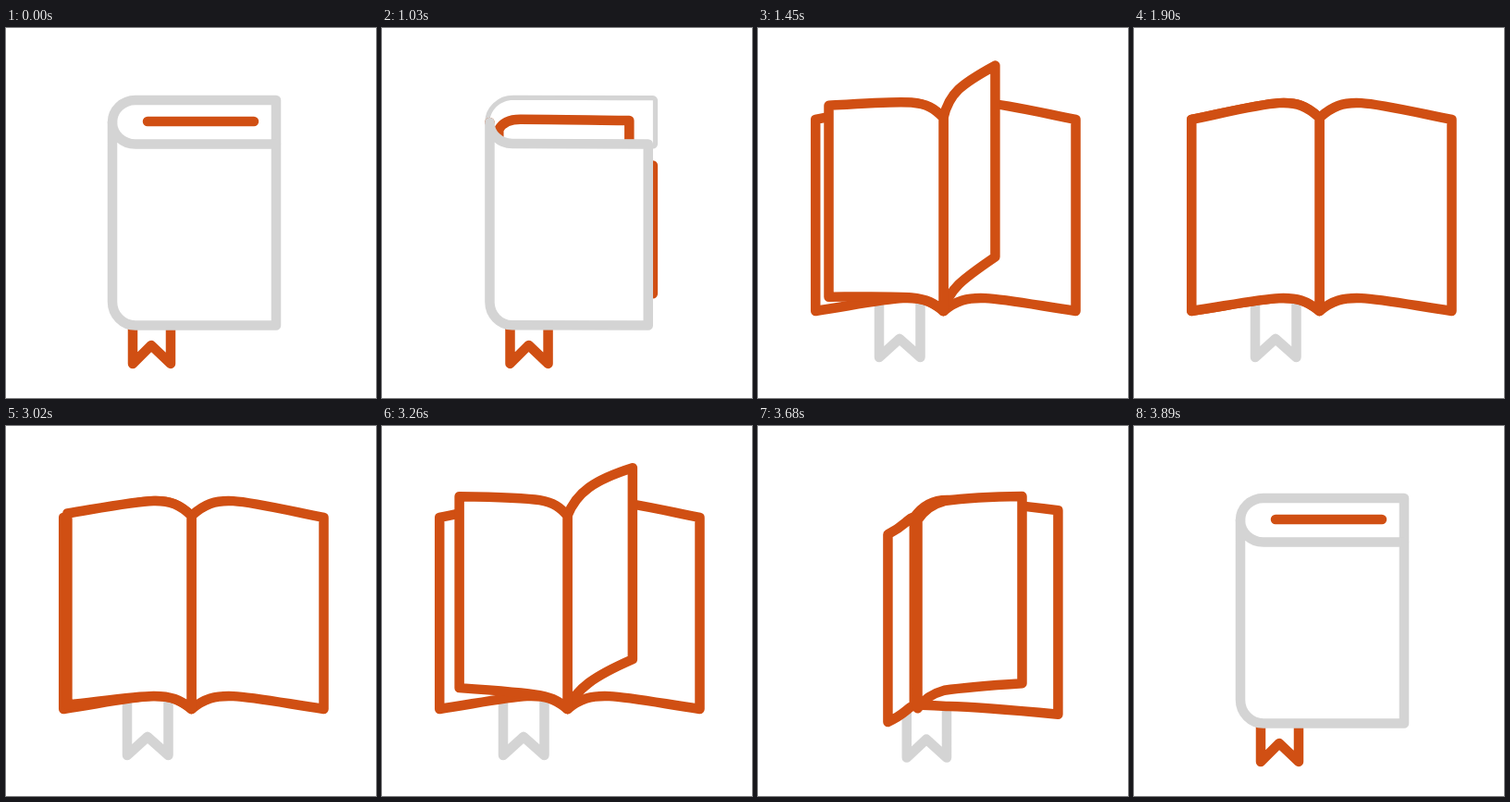
An HTML page for the animation above (3920 ms loop, 400 by 400 pixels).

```html
<!DOCTYPE html>
<html lang="en">
<head>
<meta charset="utf-8">
<title>Book</title>
<style>
  html, body { margin: 0; width: 100%; height: 100%; overflow: hidden; background: #fff; }
  svg { display: block; width: 100%; height: 100%; }
</style>
</head>
<body>
<svg id="stage" viewBox="0 0 400 400" fill="#fff" stroke-width="10.5"
     stroke-linecap="round" stroke-linejoin="round"></svg>
<script>
const LOOP = 3920, STEP = 30, STEPS = 30;
const OPEN_AT = 1030, CLOSE_AT = 3020;
const COVER_TIME = 360, PAGE_TIME = 415, PAGE_STARTS = [100, 295, 490];
const GRAY = '#d4d4d4', ORANGE = '#d04f13';

const stage = document.getElementById('stage');
const clamp = v => Math.max(0, Math.min(1, v));
const mix = (a, b, t) =>
  Array.isArray(a) ? a.map((v, i) => mix(v, b[i], t)) : a + (b - a) * t;

function blend(keys, at) {
  let i = 1;
  while (i < keys.length - 1 && at > keys[i][0]) i++;
  const [from, a] = keys[i - 1], [to, b] = keys[i];
  return mix(a, b, clamp((at - from) / (to - from)));
}

// Every page edge is two joined cubics (seven points) relative to the spine.
function split([x1, y1, x2, y2, x3, y3]) {
  const p = [0, 0], q = [x1, y1], r = [x2, y2], s = [x3, y3];
  const a = mix(p, q, .5), m = mix(q, r, .5), d = mix(r, s, .5);
  const b = mix(a, m, .5), c = mix(m, d, .5);
  return [p, a, b, mix(b, c, .5), c, d, s];
}
const lower = ([x1, y1, x2, y2, x3, y3]) => split([x1, y1 + 3, x2, y2 + 3, x3, y3 - 2]);
const closedEdge = y =>
  [[0, 0], [0, y * .55], [11, y], [25, y], [75, y], [126, y], [177, y]];

const FLAT = [28, -25, 45, -18, 143, 2];
const FLAT_LEFT = FLAT.map((v, i) => i % 2 ? v : -v * .967);
const UPRIGHT = split([2, 8, 5, 16, 10, 24]);
const TURN = [
  [-1, FLAT],
  [-.55, [12, -25, 35, -40, 79, -49]],
  [-.31, [3, -27, 12, -35, 45, -60]],
  [.2, [-4, -25, -10, -38, -29, -62]],
  [.79, [-14, -17, -22, -20, -113, -25]],
  [1, FLAT_LEFT]
];
const INNER_EDGE = [[10, 8], [14, 0], [22, -3], [33, -3], [75, -3], [120, -2], [151, -2]];

const moveTo = (points, [x, y]) => points.map(p => [p[0] + x, p[1] + y]);
const curve = p => `${p[0]}C${p.slice(1).join(' ')}`;
const sheet = (top, bottom) => `M${curve(top)}L${curve([...bottom].reverse())}`;
const path = (d, color, extra = '') => `<path d="${d}" stroke="${color}" ${extra}/>`;

function draw(step) {
  const time = step * STEP;
  const m = (1 - Math.cos(Math.PI * clamp(time / COVER_TIME))) / 2;
  const flipped = m > .5;
  const head = mix([115, 102], [200.5, 97], m);
  const foot = mix([115, 296], [200.5, 306], m);

  const sway = 30 * Math.sin(Math.PI * m);
  const ribbon = mix(
    [[137, 310], [137, 363], [157, 343], [178, 363], [178, 310]],
    [[131, 290], [131, 356], [153, 336], [175.5, 356], [175.5, 290]], m);
  let out = path('M' + moveTo(ribbon, [sway, 0]).join('L'), flipped ? GRAY : ORANGE);

  // Back cover: gray rim, then the orange outline grows from its outer edge.
  const backTop = moveTo(mix(closedEdge(-24), split(FLAT), m), head);
  const backBottom = moveTo(mix(closedEdge(25.5), lower(FLAT), m), foot);
  const grown = clamp((step - 1) / 4);
  if (grown < 1) out += path(`M${curve(backTop)}v47`, GRAY);
  if (step > 0) {
    const from = mix(.417, 0, grown), to = mix(.64, 1, grown);
    const dash = grown < 1 ? `pathLength="1" stroke-dasharray="0 ${from} ${to - from} 2"` : '';
    out += path(sheet(backTop, backBottom), ORANGE, dash);
  }

  const frontTop = blend([[0, closedEdge(23.5)], [.5, UPRIGHT], [1, split(FLAT_LEFT)]], m);
  const frontBottom = blend([[0, closedEdge(25.5)], [.5, UPRIGHT], [1, lower(FLAT_LEFT)]], m);
  const front = path(sheet(moveTo(frontTop, head), moveTo(frontBottom, foot)) + 'Z',
    flipped ? ORANGE : GRAY);

  const right = [], left = [];
  PAGE_STARTS.forEach((start, i) => {
    const progress = (time - start) / PAGE_TIME;
    if (progress >= 1 || (progress <= 0 && (i || !step))) return;
    const turn = -Math.cos(Math.PI * clamp(progress));
    const pose = blend(TURN, turn);
    const top = i ? split(pose) : mix(INNER_EDGE, split(pose), m);
    const bottom = i ? lower(pose) : mix(INNER_EDGE, lower(pose), m);
    const page = path(sheet(moveTo(top, head), moveTo(bottom, foot)) + 'Z', ORANGE);
    if (turn < 0) right.unshift(page); else left.push(page);
  });
  const pages = step ? [...right, ...left].join('') : path('M153 101H268', ORANGE);

  stage.innerHTML = out + (flipped ? front + pages : pages + front);
}

function frame() {
  const t = performance.now() % LOOP;
  const step = t < CLOSE_AT
    ? Math.max(0, Math.min(STEPS, Math.floor((t - OPEN_AT) / STEP) + 1))
    : Math.max(0, STEPS - 1 - Math.floor((t - CLOSE_AT) / STEP));
  draw(step);
  requestAnimationFrame(frame);
}
frame();
</script>
</body>
</html>
```
